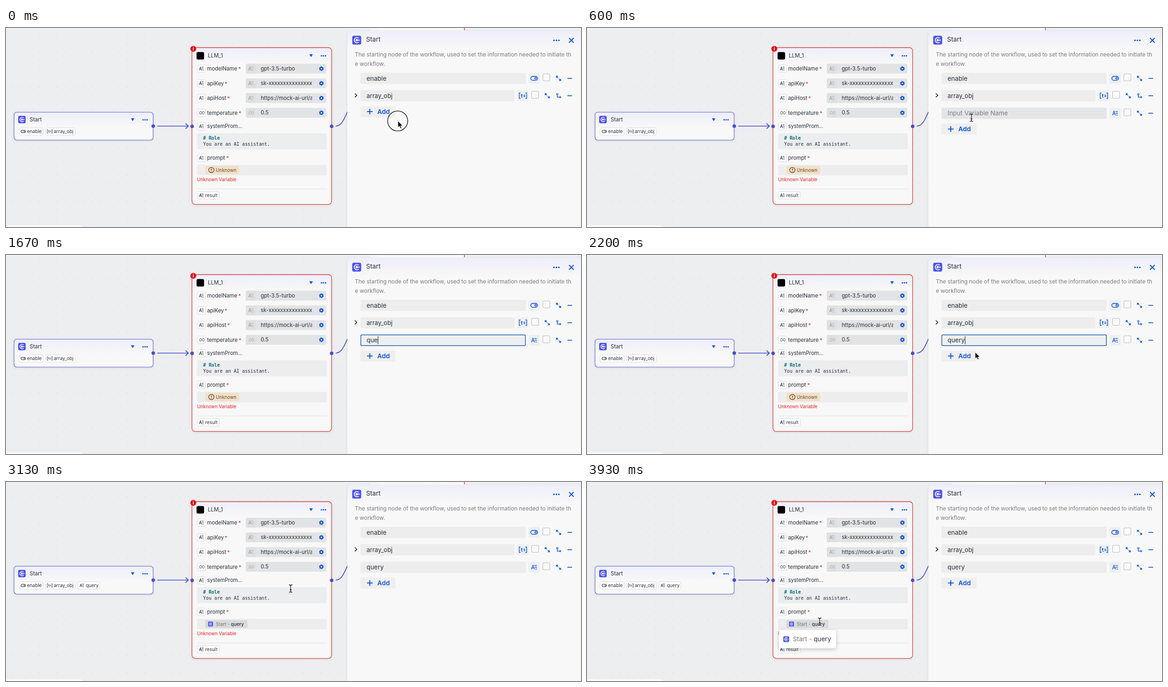
Write an HTML page that moves like this. It is 1228x426 px and loops after 3.99 s.

```html
<!DOCTYPE html>
<html lang="en">
<head>
<meta charset="utf-8">
<title>Workflow editor</title>
<style>
  html, body { margin: 0; width: 100%; height: 100%; overflow: hidden; background: #eceef0; }
  svg { position: absolute; left: 0; top: 0; font-family: Inter, Arial, sans-serif; }
  text { white-space: pre; }
  .mono { font-family: "DejaVu Sans Mono", monospace; }

  .anim { animation: 3990ms step-end infinite; }
  .before-add { animation-name: before-add; }
  .after-add { animation-name: after-add; }
  .hover { animation-name: hover; }
  .focus { animation-name: focus; }
  .hint { animation-name: hint; }
  .unbound { animation-name: unbound; }
  .bound { animation-name: bound; }
  .tip { animation: tip 3990ms linear infinite; }
  .pointer { animation: move 3990ms ease-in-out infinite; }
  .shown { animation-name: shown; }
  .arrow { animation-name: arrow; }
  .beam { animation-name: beam; }
  .ring { animation-name: ring; }

  @keyframes before-add { 0% { opacity: 1 } 6.77%, to { opacity: 0 } }
  @keyframes after-add { 0% { opacity: 0 } 6.77%, to { opacity: 1 } }
  @keyframes hover { 0% { opacity: 0 } 10.8% { opacity: 1 } 21.8%, to { opacity: 0 } }
  @keyframes focus { 0% { opacity: 0 } 21.8% { opacity: 1 } 60.15%, to { opacity: 0 } }
  @keyframes hint { 0% { opacity: 1 } 33.3%, to { opacity: 0 } }
  @keyframes unbound { 0% { opacity: 1 } 61.9%, to { opacity: 0 } }
  @keyframes bound { 0% { opacity: 0 } 61.9%, to { opacity: 1 } }
  @keyframes tip { 0%, 90.2% { opacity: 0 } 92.5%, to { opacity: 1 } }
  @keyframes shown { 0% { opacity: 1 } 30.1% { opacity: 0 } 53.4%, to { opacity: 1 } }
  @keyframes arrow { 0% { opacity: 1 } 10.8% { opacity: 0 } 54.5% { opacity: 1 } 77%, to { opacity: 0 } }
  @keyframes beam { 0% { opacity: 0 } 10.8% { opacity: 1 } 54.5% { opacity: 0 } 77%, to { opacity: 1 } }
  @keyframes ring {
    0% { opacity: 1 } 5.1% { opacity: 0 } 21% { opacity: 1 }
    23.3% { opacity: 0 } 59.5% { opacity: 1 } 62.7%, to { opacity: 0 }
  }
  @keyframes move {
    0%, 8.27% { transform: translate(837px, 199px) }
    15.04% { transform: translate(821px, 192px) }
    20%, 53.4% { transform: translate(820px, 187px) }
    59.5%, 68.4% { transform: translate(871px, 307px) }
    78.4% { transform: translate(608px, 228px) }
    88.5%, to { transform: translate(497px, 299px) }
  }

  .typed {
    position: absolute; left: 770px; top: 174px; height: 17px;
    font: 13.4px/17px Inter, Arial, sans-serif; color: #2b2f36;
    border-right: 1px solid transparent;
    animation: caret 3990ms step-end infinite;
  }
  .typed::after { content: ""; animation: type 3990ms step-end infinite; }
  @keyframes type {
    0% { content: "" } 33.3% { content: "q" } 36.8% { content: "qu" }
    40.1% { content: "que" } 45.1% { content: "quer" } 48.4%, to { content: "query" }
  }
  @keyframes caret {
    0% { border-color: transparent } 21.8% { border-color: #111 }
    60.15%, to { border-color: transparent }
  }
</style>
</head>
<body>
<svg id="scene" width="1228" height="426"></svg>
<span class="typed"></span>
<svg width="1228" height="426">
  <defs>
    <path id="ibeam" d="M-3.5-8Q0-8 0-5.5Q0-8 3.5-8M0-5.5V5.5M-3.5 8Q0 8 0 5.5Q0 8 3.5 8M-2 2.5H2" fill="none"/>
  </defs>
  <g class="pointer">
    <g class="anim shown">
      <circle class="anim ring" cx="-.5" r="21.4" fill="none" stroke="#111" stroke-width="1.4"/>
      <path class="anim arrow" d="M0 0V14.2L3.3 11.2L5.5 16.2L7.9 15.2L5.8 10.4H10.2Z" fill="#000" stroke="#fff"/>
      <g class="anim beam">
        <use href="#ibeam" stroke="#fff" stroke-width="2.6"/>
        <use href="#ibeam" stroke="#111" stroke-width="1.3"/>
      </g>
    </g>
  </g>
</svg>

<script>
const BLUE = '#0b53dc', INK = '#2b2f36', VIOLET = '#4d53e8', LINE = '#4a4cc9', RED = '#e8201f';

const rect = (x, y, w, h, fill, r = 0, more = '') =>
  `<rect x="${x}" y="${y}" width="${w}" height="${h}" rx="${r}" fill="${fill}" ${more}/>`;
const text = (x, mid, str, size, fill = INK, more = '') =>
  `<text x="${x}" y="${mid + size * .36}" font-size="${size}" fill="${fill}" ${more}>${str}</text>`;
const line = (d, color, width = 1.2, more = '') =>
  `<path d="${d}" fill="none" stroke="${color}" stroke-width="${width}" ${more}/>`;
const dot = (x, y, r, fill) => `<circle cx="${x}" cy="${y}" r="${r}" fill="${fill}"/>`;
const at = (x, y, body, scale = 1) => `<g transform="translate(${x} ${y}) scale(${scale})">${body}</g>`;
const timed = (name, body) => `<g class="anim ${name}">${body}</g>`;

// Icons, drawn around their centre
const strIcon = (x, y, color, s = 1) => at(x, y,
  line('M-5.5 4.2L-2.4-4.2L.7 4.2M-4.4 1.4H-.4M.2-3.7H5.4M1.3 0H5.4M2.4 3.7H5.4', color, 1.2), s);
const numIcon = (x, y, color) => text(x, y, '.00', 9, color, 'text-anchor="middle"');
const arrIcon = (x, y, color, s = 1) => at(x, y,
  line('M-5-5.5H-7.5V5.5H-5M5-5.5H7.5V5.5H5M-2.6-3.6V2.4Q-2.6 3.4-.8 3.2M-4.4-1.4H-.8M1-1.2H4.8M1 1.7H4.8', color, 1.3), s);
const toggle = (x, y, color, s = 1) => at(x, y,
  rect(-6.8, -4, 13.6, 8, 'none', 4, `stroke="${color}" stroke-width="1.5"`) +
  `<circle cx="2.8" r="1.7" fill="none" stroke="${color}" stroke-width="1.3"/>`, s);
const startIcon = (x, y, s = 1) => at(x, y, rect(-8, -8, 16, 16, VIOLET, 3) +
  line('M3.6-3.4A4.7 4.7 0 1 0 3.6 3.4M5.5 0H-1.4M.8-2.2L-1.6 0L.8 2.2', '#fff', 1.5), s);
const dots = (x, y, gap, r) => [-gap, 0, gap].map(d => dot(x + d, y, r, BLUE)).join('');
const caretDown = (x, y) => `<path d="M${x - 3.8} ${y - 2.8}h7.6l-3.8 6z" fill="${BLUE}"/>`;
const gear = (x, y) => at(x, y,
  `<circle r="2.9" fill="none" stroke="${BLUE}" stroke-width="2.2"/>` +
  `<circle r="4.2" fill="none" stroke="${BLUE}" stroke-width="1.4" stroke-dasharray="2.2 2.2"/>`);
const expand = (x, y) => at(x, y,
  line('M-.8-.8L-4.2-4.2M.8.8L4.2 4.2M-4.6-1.2V-4.6H-1.2M4.6 1.2V4.6H1.2', BLUE, 1.5));
const minus = (x, y) => line(`M${x - 5} ${y}h10`, BLUE, 1.7);
const branch = (x, y) => at(x, y,
  `<circle cx="-2.6" cy="-3.2" r="1.7" fill="none" stroke="${BLUE}" stroke-width="1.2"/>` +
  line('M-2.6-1.4V3H.8M3.4.6V5.4M1 3H5.8', BLUE, 1.3));
const plus = (x, y) => line(`M${x - 6} ${y}h12M${x} ${y - 6}v12`, BLUE, 1.9);

const tile = (x, y, icon) =>
  rect(x, y - 8, 17.5, 16, '#fff', 2.5, 'stroke="#d7d9dc"') + icon(x + 8.8, y, INK, .85);
const chip = (x, y, w, icon, label) =>
  rect(x, y - 7.8, w, 15.5, '#fff', 2.5, 'stroke="#d9dbde"') + icon + text(x + 17, y, label, 9.9);
const star = (x, y) => text(x, y + 1, '*', 11.3, RED);
const port = (x, y) => dot(x, y, 3.8, LINE);

function backdrop() {
  const wing = rect(0, 0, 1228, 1.5, '#f7f8f8') + rect(779, 0, 17, 8, '#f4f5f6') +
    rect(796, 0, 183, 8, '#f8f8f8') + line('M979 0V5', RED, 1.3);
  return rect(0, 0, 1228, 426, '#eceef0') + rect(0, 0, 1228, 426, 'url(#grid)') + wing +
    `<path d="M0 422.5H154Q162 422.5 164 426H0Z" fill="#fbfbfb"/>`;
}

function startCard() {
  return rect(17.2, 180.2, 297, 59.8, 'url(#head1)', 6, 'stroke="#6462d4" stroke-width="1.1" filter="url(#soft)"') +
    startIcon(34, 196) + text(50.5, 195.5, 'Start', 11.5) +
    caretDown(270.5, 196) + dots(297, 196.5, 4.3, 1.6) +
    chip(28, 221.5, 51, toggle(36.8, 221.5, INK, .7), 'enable') +
    chip(85, 221.5, 63, arrIcon(93.5, 221.5, INK, .7), 'array_obj') +
    timed('bound', chip(153.5, 221.5, 47, strIcon(162, 221.5, INK, .8), 'query'));
}

function edges() {
  return line('M323 210H389M383.5 204.5L389.5 210L383.5 215.5', LINE, 1.7) +
    line('M704 210C716 210 721 198 729.5 179', LINE, 1.7);
}

function field(y, name, icon, value, starX) {
  return tile(408.5, y, icon) + text(429.5, y, name, 11.3) + star(starX, y) +
    rect(512, y - 10.5, 172, 21, '#e2e3e4', 3) + rect(512, y - 10.5, 22, 21, '#dfe0e1', 3) +
    icon(523, y, '#a3a6aa', .95) +
    `<g clip-path="url(#value)">${text(544, y - .5, value, 11.4)}</g>` + gear(673.5, y);
}

function llmCard() {
  return rect(397.2, 42, 298.2, 335.6, 'url(#head2)', 7, 'stroke="#d8423f" stroke-width="1.3" filter="url(#soft)"') +
    rect(407, 51.5, 16, 16, '#000', 3) + text(431, 58.5, 'LLM_1', 11.6) +
    caretDown(651.5, 59) + dots(678, 59.5, 4.3, 1.6) +
    dot(400, 44.5, 6.2, '#e60c0c') + text(400, 44.5, 'i', 9.5, '#fff', 'text-anchor="middle" font-weight="800"') +
    field(87, 'modelName', strIcon, 'gpt-3.5-turbo', 496) +
    field(118.5, 'apiKey', strIcon, 'sk-xxxxxxxxxxxxxxxxxx', 467) +
    field(150, 'apiHost', strIcon, 'https://mock-ai-url/a', 472.5) +
    field(181.5, 'temperature', numIcon, '0.5', 497) +
    tile(408.5, 210.5, strIcon) + text(429.5, 210, 'systemProm...', 11.2) +
    rect(408, 225.5, 277, 34, '#ebedee', 2) +
    text(421, 235, '# Role', 9.9, '#0b6e78', 'class="mono" font-weight="700"') +
    text(421, 248.8, 'You are an AI assistant.', 9.9, INK, 'class="mono"') +
    tile(408.5, 278, strIcon) + text(429.5, 278, 'prompt', 11.3) + star(470.5, 278) +
    rect(408, 293, 277, 22.5, '#ededed', 2) +
    timed('unbound', rect(426, 295, 72, 18, '#f1e0c8', 2) +
      `<circle cx="438.6" cy="304" r="5.6" fill="none" stroke="#4f3517" stroke-width="1.2"/>` +
      line('M438.6 300.8V304.8M438.6 306V307.3', '#4f3517', 1.3) +
      text(448, 304, 'Unknown', 9.9, '#6a4a28')) +
    timed('bound', rect(425.5, 295.5, 90, 17, '#d9dadb', 2) + startIcon(436.8, 304, .66) +
      text(448, 304, 'Start - <tspan fill="#2b2f36" font-weight="500">query</tspan>', 9.9, '#74777c')) +
    text(408, 324.5, 'Unknown Variable', 9.8, RED) +
    line('M408 344.5H685', '#e3e4e6', 1) +
    chip(408.5, 358.3, 47, strIcon(417.3, 358.3, INK, .85), 'result') +
    port(314.5, 210) + port(397.5, 210.5) + port(695.5, 210.5);
}

function varRow(y, width, icon, nested) {
  const x = nested ? 1104 : 1128;
  return rect(757, y - 12, width, 24, '#ededee', 3) +
    rect(x - 12, y - 11.5, 24, 23, '#eeeff1', 3) + icon(x, y, BLUE, 1.05) +
    rect(x + 18.5, y - 9.5, 15, 15, '#fafafa', 2.5, 'stroke="#b9bcc0" stroke-width="1.1"') +
    expand(x + 52, y) + (nested ? branch(1180, y) : '') + minus(1204, y);
}

const addButton = y => rect(757, y - 12, 75, 24, '#efeff0', 3) + plus(777, y) +
  text(793, y, 'Add', 13.6, BLUE, 'font-weight="600"');

function panel() {
  return rect(729, 6, 520, 440, 'url(#head3)', 8, 'filter="url(#soft)"') +
    startIcon(749, 26, 1.2) + text(769, 24.5, 'Start', 13.7) +
    dots(1175.5, 26.5, 5.2, 1.7) + line('M1202.5 21.5L1212.5 31.5M1212.5 21.5L1202.5 31.5', BLUE, 2) +
    text(745, 56.5, 'The starting node of the workflow, used to set the information needed to initiate th', 11.92, '#787b80') +
    text(745, 76.5, 'e workflow.', 11.92, '#787b80') +
    varRow(107.8, 353, toggle) + text(770, 107.8, 'enable', 13.4) +
    line('M745 140L749.2 144.2L745 148.4', INK, 1.7) +
    varRow(145, 329, arrIcon, true) + text(770, 145, 'array_obj', 13) +
    timed('before-add', addButton(179)) +
    timed('after-add', varRow(182.5, 353, strIcon) + addButton(216.3) +
      timed('hover', rect(757, 170.5, 353, 24, '#e4e5e6', 3)) +
      timed('focus', rect(757.7, 171, 351.6, 23, '#eeeff0', 2.5, 'stroke="#2463b8" stroke-width="1.5"')) +
      timed('hint', text(770, 182.5, 'Input Variable Name', 13.5, '#7b7e83')));
}

function tooltip() {
  return `<g class="tip">` + rect(410, 317, 122, 39, '#fff', 5, 'filter="url(#lift)"') +
    startIcon(425.5, 336.5, .78) +
    text(439.5, 336.5, 'Start - <tspan fill="#2b2f36">query</tspan>', 13.6, '#74777c') + `</g>`;
}

const head = (id, y1, y2) =>
  `<linearGradient id="${id}" gradientUnits="userSpaceOnUse" x1="0" x2="0" y1="${y1}" y2="${y2}">
    <stop stop-color="#eeeefb"/><stop offset="1" stop-color="#f8f8f8"/></linearGradient>`;
const shadow = (id, dy, blur, alpha) =>
  `<filter id="${id}" x="-20%" y="-30%" width="140%" height="170%">
    <feDropShadow dx="0" dy="${dy}" stdDeviation="${blur}" flood-opacity="${alpha}"/></filter>`;

const defs = `<defs>
  <pattern id="grid" width="18.8" height="18.8" x="5" y="4" patternUnits="userSpaceOnUse">
    <circle cx="9.4" cy="9.4" r=".8" fill="#cfd2d7"/></pattern>
  <clipPath id="value"><rect x="540" y="70" width="114" height="130"/></clipPath>
  ${head('head1', 180, 212)}${head('head2', 42, 76)}${head('head3', 6, 46)}
  ${shadow('soft', 1.5, 2.5, .08)}${shadow('lift', 2, 4, .22)}
</defs>`;

document.getElementById('scene').innerHTML =
  defs + backdrop() + edges() + startCard() + llmCard() + panel() + tooltip();
</script>
</body>
</html>
```
